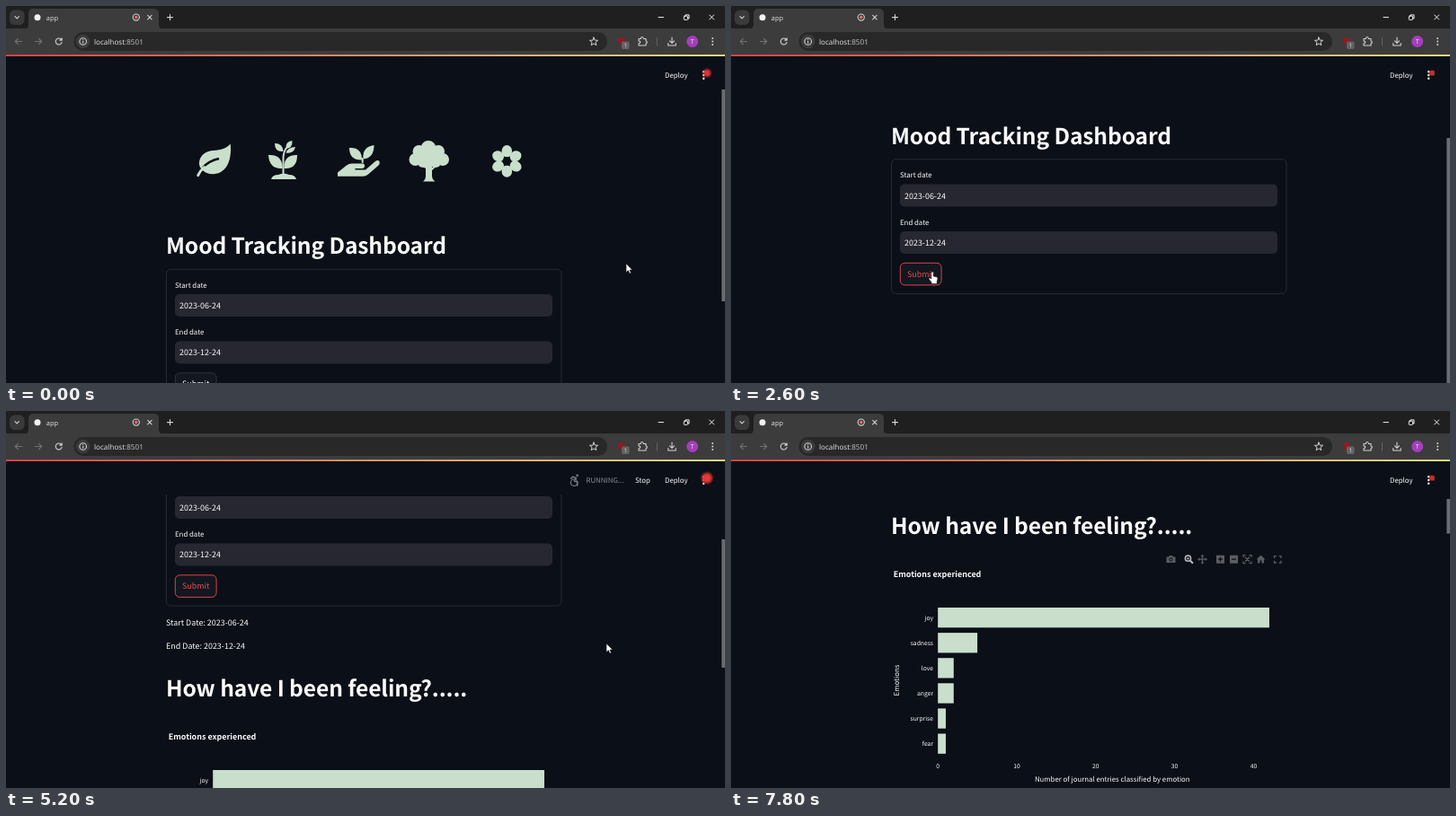
Recreate the animation shown at these times as an HTML page. Size 800 px wide and 420 px high, loop 8000 ms.

```html
<!DOCTYPE html>
<html lang="en">
<head>
<meta charset="utf-8">
<title>Mood dashboard</title>
<style>
  html, body { margin: 0; width: 100%; height: 100%; overflow: hidden; background: #0b0f17; }
  svg { display: block; width: 100vw; height: 100vh; }
  text { font: 8.95px "Noto Sans CJK SC", "Noto Sans CJK JP", "Noto Sans CJK", sans-serif; fill: #fafafa; white-space: pre; text-rendering: geometricPrecision; }
  text.h1 { font-size: 24.6px; font-weight: 700; letter-spacing: -.005em; }
  text.bold { font-weight: 700; }
  text.small { font-size: 7.83px; }
  text.tick { font-size: 6.75px; }
  text.ui { font-family: "Open Sans", "Noto Sans", sans-serif; font-size: 8.15px; fill: #e6e6e6; }
  .line { fill: none; stroke: #d2d2d2; stroke-width: 1.1; stroke-linecap: round; stroke-linejoin: round; }
  .dim { stroke: #727272; }
  .field { fill: #262730; }
  .mint { fill: #c9dfcb; }
  .stem { fill: none; stroke: #c9dfcb; stroke-linecap: round; stroke-linejoin: round; }
  .run { fill: none; stroke: #77797d; stroke-width: 1.5; stroke-linecap: round; stroke-linejoin: round; }
  .bar { fill: #5b5d61; }
  .barline { fill: none; stroke: #5b5d61; stroke-width: 1.3; }
</style>
</head>
<body>
<svg viewBox="0 0 800 420" preserveAspectRatio="none">
  <defs>
    <linearGradient id="deco"><stop stop-color="#e8474b"/><stop offset="1" stop-color="#f3f08a"/></linearGradient>
    <radialGradient id="glow">
      <stop stop-color="#ef3a36"/><stop offset=".55" stop-color="#e03632" stop-opacity=".9"/><stop offset="1" stop-color="#a02020" stop-opacity="0"/>
    </radialGradient>
    <clipPath id="view"><rect y="93" width="800" height="327"/></clipPath>
  </defs>
  <rect width="800" height="420" fill="#0b0f17"/>

  <g clip-path="url(#view)">
    <g id="page">
      <g id="plants">
        <path class="mint" d="M249.7 153.6C251.500 170 246.500 186.500 231 187.200C226 187.400 222 186 220 184C216.500 181 214.500 178 215 174C216 165.500 223 161.500 231 161C239 160.500 245.500 159 249.700 153.600Z"/>
        <path d="M219 180C224 174.500 230 171.500 237 170" fill="none" stroke="#0b0f17" stroke-width="2.400"/>
        <path class="stem" d="M213.700 188.700Q216 183.500 220.500 179.500" stroke-width="3"/>

        <path class="stem" d="M308.500 188V170Q308.500 163 312 158" stroke-width="2"/>
        <path class="mint" d="M295 193Q296.500 188 303 188Q309 185.500 315 188Q321.500 188 323 193Z
          M292 166Q306 165 307.500 178L307.500 181Q293 182 292 166Z
          M324 166Q310.500 165.500 309.500 178L309.500 181Q324 182 324 166Z
          M299 153Q308 153 308.500 162Q299 163 299 153Z
          M318.500 150Q319 158.500 311.500 159Q310.500 151 318.500 150Z
          M322 157Q320 165 311.500 163.500Q314 157 322 157Z"/>

        <path class="mint" d="M382 158Q396 157 396 171.500Q382 172 382 158Z M409.500 155Q409.500 169.500 397.500 170.500Q396 157 409.500 155Z
          M369 185.500L379 177.500Q381.500 175.500 385 175.500H397Q399.500 176 399 179Q398.500 181 396 181H388.500V182.500H400L411 173Q414 171 415.500 173.200Q416.500 175.500 414 178L403 187.500Q400.500 189.700 397 189.700H369Z"/>
        <path class="stem" d="M396.700 170V174" stroke-width="2"/>

        <g class="mint">
          <circle cx="470" cy="158.500" r="8.500"/><circle cx="459.500" cy="162" r="7"/><circle cx="481" cy="162" r="7"/>
          <circle cx="455.500" cy="171" r="7"/><circle cx="486" cy="171" r="7"/><circle cx="464" cy="174" r="6"/><circle cx="478" cy="174" r="6"/>
          <rect x="459" y="161" width="22" height="15"/>
          <path d="M467 174H474V189Q474 193 477.500 195.500H464Q467 193 467 189Z"/>
        </g>
        <path class="stem" d="M470.500 185L480 176M470.500 182L461.500 176" stroke-width="2.200"/>
      </g>

      <text class="h1" x="178" y="276">Mood Tracking Dashboard</text>
      <rect x="178.500" y="293.300" width="439.500" height="149.700" rx="5" fill="none" stroke="#272a32" stroke-width="1"/>
      <text class="small" x="188" y="313.700">Start date</text>
      <rect class="field" x="188" y="321" width="420" height="25" rx="5"/>
      <text x="193" y="337">2023-06-24</text>
      <text class="small" x="188" y="366.200">End date</text>
      <rect class="field" x="188" y="373.500" width="420" height="25" rx="5"/>
      <text x="193" y="389.400">2023-12-24</text>
      <rect id="button" x="188.300" y="408.800" width="45.800" height="24.600" rx="5" fill="#131720" stroke-width="1"/>
      <text id="submit" x="196" y="424.300">Submit</text>

      <g id="results">
        <text x="178" y="464.500">Start Date: 2023-06-24</text>
        <text x="178" y="490.800">End Date: 2023-12-24</text>
        <text class="h1" x="178" y="543.500">How have I been feeling?.....</text>
        <text class="bold" x="180.700" y="591.500">Emotions experienced</text>
        <text class="small" transform="translate(187 707) rotate(-90)" text-anchor="middle">Emotions</text>
        <text class="small" x="424.300" y="819.600" text-anchor="middle">Number of journal entries classified by emotion</text>
      </g>
    </g>
    <rect id="thumb" x="796.300" width="3.700" fill="#6a6c70"/>
  </g>

  <g id="modebar">
    <path class="bar" fill-rule="evenodd" d="M484.500 162.500H487L488 161H491L492 162.500H494.500V169H484.500Z M489.500 163.300a2.200 2.200 0 1 0 .01 0Z"/>
    <circle cx="489.500" cy="165.500" r="1.200" class="bar"/>
    <g fill="none" stroke="#bcbdbf"><circle cx="508.500" cy="164.200" r="3.100" stroke-width="1.500"/><path d="M511 166.700L514 169.700" stroke-width="2"/><path d="M507 164.200H510M508.500 162.700V165.700" stroke-width=".8"/></g>
    <path class="barline" d="M520 165.200H529M524.500 160.700V169.700" stroke-width="1"/>
    <path class="bar" d="M519 165.200l2.300-2v4Z M530 165.200l-2.300-2v4Z M524.500 159.700l2 2.300h-4Z M524.500 170.700l2-2.300h-4Z"/>
    <path class="bar" d="M540 160.700H549V169.700H540Z M555 160.700H564V169.700H555Z"/>
    <path d="M542 165.200H547M544.500 162.700V167.700M557 165.200H562" stroke="#0b0f17" stroke-width="1.300"/>
    <path class="barline" d="M570 163V160.700H572.500M576.500 160.700H579V163M579 167.500V169.700H576.500M572.500 169.700H570V167.500M572 162.700L577 167.700M577 162.700L572 167.700"/>
    <path class="bar" d="M584.500 165.300L589.500 160.700L594.500 165.300H593V169.500H590.500V166.500H588.500V169.500H586V165.300Z"/>
    <path class="barline" d="M604.500 164V161.700H606.800M609.700 161.700H612V164M612 166.800V169H609.700M606.800 169H604.500V166.800"/>
  </g>

  <text class="small" x="733" y="80">Deploy</text>
  <g fill="#fafafa"><circle cx="776.200" cy="73.300" r="1.200"/><circle cx="776.200" cy="77" r="1.200"/><circle cx="776.200" cy="80.700" r="1.200"/></g>
  <rect x="777" y="71.800" width="5.800" height="5.800" rx="1.200" fill="#b52d2b"/>
  <circle id="pulse" cx="780" cy="74.700" fill="url(#glow)"/>

  <g id="running">
    <g id="runner" class="run">
      <circle cx="634.300" cy="71.600" r="1.100" fill="#77797d" stroke-width=".6"/>
      <path d="M632.500 74.500L631 79L633.800 80.700L634 84M631 79L630 81.200L626.800 81.700M628.300 77.200V75.500L632.500 74.500L634.500 76.700L637 77.300"/>
    </g>
    <g id="wheel" class="run">
      <circle cx="635.600" cy="71.800" r="1.100" fill="#77797d" stroke-width=".6"/>
      <circle cx="632" cy="79.700" r="3.700" stroke-width="1.200"/>
      <path d="M630.500 73.300L634.500 74.700L632.300 78L636 79.200L635.600 83M630.500 73.300L628.600 75.200"/>
    </g>
    <text class="small" x="645.500" y="80" style="fill:#8a8c90">RUNNING...</text>
    <text class="small" x="700" y="80">Stop</text>
  </g>

  <!-- Browser window -->
  <rect width="800" height="26" fill="#1f1f20"/>
  <path d="M20 25.500Q25 25.500 25 20.500V8.500Q25 3 30.500 3H164.500Q170 3 170 8.500V20.500Q170 25.500 175 25.500Z" fill="#3c3c3d"/>
  <rect y="25" width="800" height="29.500" fill="#3c3c3d"/>
  <rect y="54.200" width="800" height="1.800" fill="url(#deco)"/>
  <rect x="4" y="4.500" width="16.500" height="16.500" rx="5.500" fill="#3a3a3b"/>
  <path class="line" d="M10 11.700L12.200 13.900L14.400 11.700"/>
  <circle cx="35" cy="12.700" r="3.500" fill="#f2f2f2"/>
  <text class="ui" x="44.800" y="15.600" style="font-size:7.400px">app</text>
  <circle cx="144.800" cy="12.600" r="3.600" class="line" stroke-width="1"/>
  <circle cx="144.800" cy="12.600" r="1.800" fill="#e46962"/>
  <path class="line" d="M157.700 10.400L162.100 14.800M162.100 10.400L157.700 14.800M179.500 12.600H185.500M182.500 9.600V15.600"/>
  <g class="line" style="stroke:#f0f0f0;stroke-width:1">
    <path d="M726 12.600H731.500M782.700 10L787.700 15M787.700 10L782.700 15M756 10.900V9.900H760V14H759"/>
    <rect x="754.300" y="11.200" width="4.200" height="4.200" rx=".8"/>
  </g>
  <path class="line dim" d="M17.500 39.500H10.500M13.500 36.300L10.300 39.500L13.500 42.700M32.500 39.500H39.500M36.500 36.300L39.700 39.500L36.500 42.700"/>
  <path class="line" d="M61.700 37.600A3.500 3.500 0 1 0 62.100 40.500M62.200 35.800V38.100H59.900"/>
  <rect x="75.500" y="29" width="593.500" height="21" rx="10.500" fill="#282829"/>
  <circle cx="85.700" cy="39.500" r="7.800" fill="#3c3c3d"/>
  <circle class="line" cx="85.700" cy="39.500" r="3.800"/>
  <path class="line" d="M85.700 39.300V41.300M85.700 37.500V37.600"/>
  <text class="ui" x="98" y="42.500">localhost<tspan fill="#c4c4c4">:8501</tspan></text>
  <path id="star" class="line" style="stroke-width:1"/>
  <circle cx="685" cy="39" r="4" fill="#8e1c20"/>
  <rect x="685" y="39.500" width="8.600" height="8.600" rx="2" fill="#626365"/>
  <text class="ui" x="689.300" y="46.300" text-anchor="middle" style="font-size:6.200px">1</text>
  <path class="line" d="M704 36.500H706.300Q706.300 34.500 707.800 34.500T709.300 36.500H712V39Q713.300 39 713.300 40.300T712 41.700V44H704V41.700Q705.700 41.700 705.700 40.300T704 39Z"/>
  <path d="M724.500 35V44.500" stroke="#626265"/>
  <path class="line" d="M741 35V41M738.500 38.800L741 41.300L743.500 38.800M736.800 41.500V44H745.200V41.500"/>
  <circle cx="763.700" cy="39.500" r="6.500" fill="#a63dbd"/>
  <text class="ui" x="763.700" y="42.100" text-anchor="middle" style="font-size:7px">T</text>
  <g fill="#d2d2d2"><circle cx="786.200" cy="36" r="1"/><circle cx="786.200" cy="39.500" r="1"/><circle cx="786.200" cy="43" r="1"/></g>

  <g id="cursor" stroke="#111" stroke-width=".6" fill="#fff">
    <path id="arrow" d="M0 0V9.700L2.300 7.600L3.900 11.100L5.500 10.400L4 7H7Z"/>
    <path id="hand" d="M-1.200 1Q-1.200 0 0 0T1.200 1V5L4.800 5.800Q6.300 6.300 6 8L5.200 11V13.500H-1V11.700L-3.800 8.200Q-4.300 7 -3 6.800L-1.200 8Z"/>
  </g>
</svg>
<script>
const STEP = 200, LOOP = 8000;
const $ = id => document.getElementById(id);

function add(parent, tag, attrs, text) {
  const el = document.createElementNS('http://www.w3.org/2000/svg', tag);
  for (const key in attrs) el.setAttribute(key, attrs[key]);
  if (text !== undefined) el.textContent = text;
  parent.append(el);
}

function set(id, attrs) {
  for (const key in attrs) $(id).setAttribute(key, attrs[key]);
}

function show(id, on) {
  $(id).style.display = on ? '' : 'none';
}

// Piecewise linear value through [time, value] points.
function track(points, t) {
  let [t0, v0] = points[0];
  for (const [t1, v1] of points) {
    if (t < t1) return t <= t0 ? v0 : v0 + (v1 - v0) * (t - t0) / (t1 - t0);
    [t0, v0] = [t1, v1];
  }
  return v0;
}

// Flower and bookmark star
for (let k = 0; k < 6; k++) {
  add($('plants'), 'ellipse', {
    class: 'mint', cx: 557.3, cy: 161.7, rx: 5.8, ry: 6.7, transform: `rotate(${k * 60} 557.3 172.9)`
  });
}
add($('plants'), 'circle', { cx: 557.3, cy: 172.9, r: 4.6, fill: '#0b0f17' });
set('star', {
  d: 'M' + Array.from({ length: 10 }, (_, k) => {
    const r = k % 2 ? 2.1 : 4.8, a = k * Math.PI / 5;
    return `${654 + r * Math.sin(a)} ${39.8 - r * Math.cos(a)}`;
  }).join('L') + 'Z'
});

// Bar chart
const UNIT = 8.78, LEFT = 230.2;
const counts = { joy: 42, sadness: 5, love: 2, anger: 2, surprise: 1, fear: 1 };
Object.entries(counts).forEach(([name, n], k) => {
  const y = 626 + k * 28.1;
  add($('results'), 'rect', { class: 'mint', x: LEFT, y, width: n * UNIT, height: 22.3 });
  add($('results'), 'text', { class: 'tick', x: 225, y: y + 13.5, 'text-anchor': 'end' }, name);
});
for (let n = 0; n <= 40; n += 10) {
  add($('results'), 'text', { class: 'tick', x: LEFT + n * UNIT, y: 805, 'text-anchor': 'middle' }, n);
}

const scrollPath = [[200, 0], [1000, 122.5], [4800, 122.5], [5200, 226], [5800, 404.5], [6400, 404.5], [6600, 407]];
const cursorX = [[1400, 690], [2400, 224], [2800, 224], [3400, 211.5], [4400, 211.5], [5000, 668]];
const cursorY = [[1400, 287], [1900, 318], [2400, 296], [2800, 296], [3400, 305.500], [4400, 305.500], [5000, 259]];

function thumbSpan(t, scroll) {
  if (t < 3800) return [92.5 + scroll * .445, 236.5 + scroll * .3];
  if (t < 5800) return [103 + (scroll - 122.5) * .386, 143];
  return [92.5 + (scroll - 404.5) * 2.2, 38.5];
}

function render(time) {
  const frame = Math.floor(time % LOOP / STEP), t = frame * STEP;
  const scroll = track(scrollPath, t);
  set('page', { transform: `translate(0 ${-scroll})` });
  const [y, height] = thumbSpan(t, scroll);
  set('thumb', { y, height });

  const hot = t >= 2400;
  set('button', { stroke: hot ? '#d9444a' : '#30333b' });
  $('submit').style.fill = hot ? '#e8484b' : '';
  show('results', t >= 3800);
  show('running', t >= 3000 && t < 6600);
  show('runner', frame % 3 !== 2);
  show('wheel', frame % 3 === 2);
  show('modebar', t >= 7400);

  const beat = .5 + .5 * Math.cos(2 * Math.PI * (t / 1000 - .2));
  set('pulse', { r: 3 + 5 * beat, opacity: .25 + .75 * beat });

  const hand = hot && t <= 4400;
  show('cursor', t < 400 || (t >= 1400 && t < 5400));
  show('hand', hand);
  show('arrow', !hand);
  set('cursor', { transform: `translate(${track(cursorX, t)} ${track(cursorY, t)})` });
}

let start;
function tick(now) {
  start ??= now;
  render(now - start);
  requestAnimationFrame(tick);
}
render(0);
requestAnimationFrame(tick);
</script>
</body>
</html>
```
